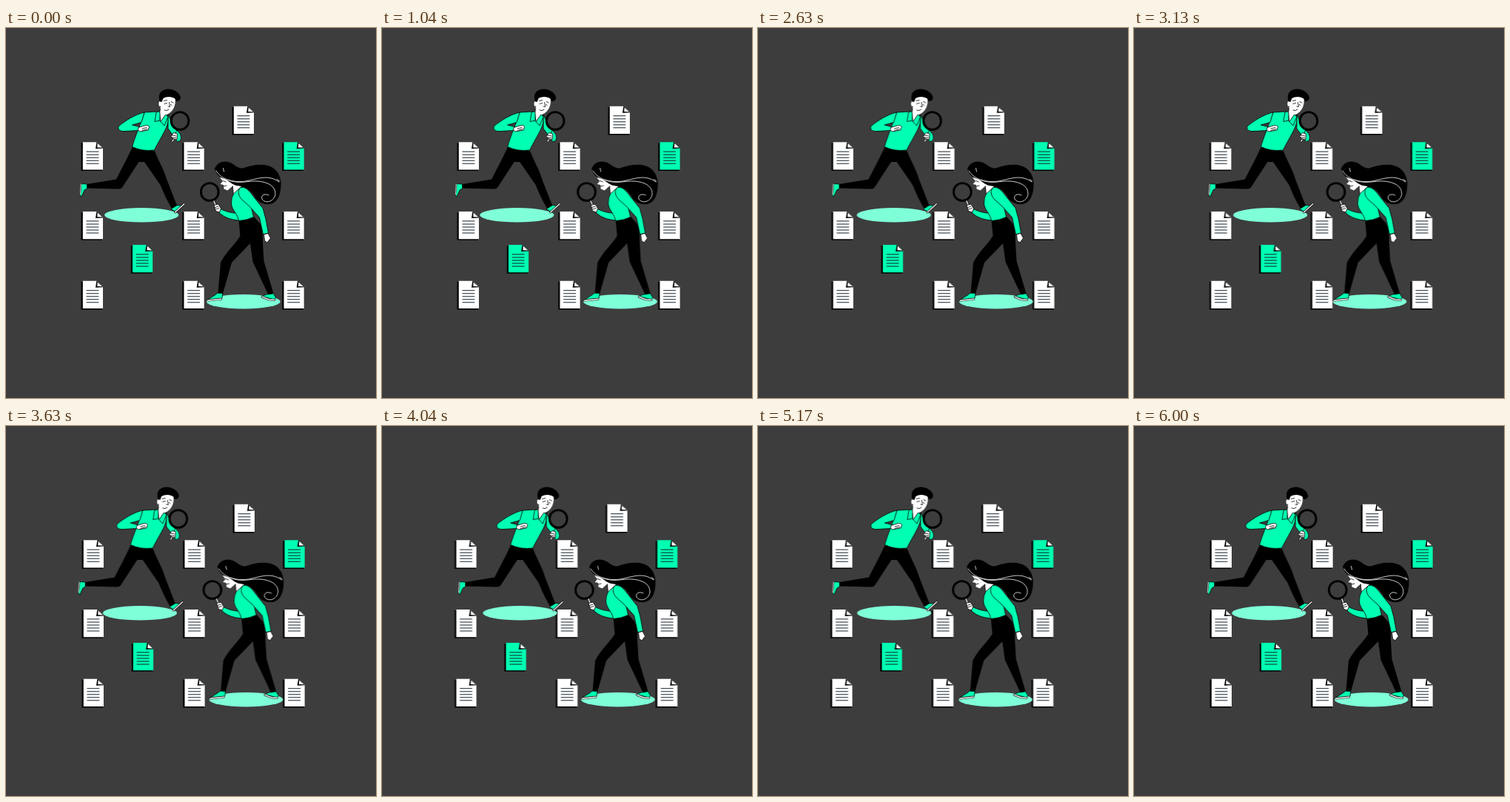
An HTML page for the animation above (6040 ms loop, 500 px wide and 500 px high).

```html
<!DOCTYPE html>
<html lang="en">
<head>
<meta charset="utf-8">
<title>Document search</title>
<style>
  html, body { margin: 0; width: 100%; height: 100%; overflow: hidden; background: #3d3d3d; }
  svg { display: block; width: 100%; height: 100%; }
  .g { fill: #00ffb2; }
  .w { fill: #fff; }
  .k { fill: #000; }
  .shade { fill: #7fffd8; }
  .o { stroke: #000; stroke-width: .8; stroke-linejoin: round; }
  .line { fill: none; stroke: #000; stroke-width: .8; stroke-linecap: round; }
  .strand { fill: none; stroke: #fff; stroke-width: .8; stroke-linecap: round; }
  .sole { fill: none; stroke: #000; stroke-width: 2.6; stroke-linecap: round; }
  .sole + .sole { stroke: #fff; stroke-width: 1.4; }
  .lens { fill: none; stroke: #000; stroke-width: 2.9; }

  /* One six-second shake per group, started 0, .5 and 1 s into the loop */
  #docs, #man, #woman { animation: 6040ms linear infinite; }
  #woman { animation-name: shake-woman; }
  #man { animation-name: shake-man; }
  #docs { animation-name: shake-docs; }

  @keyframes shake-woman {
    0%, 99.34%, 100% { transform: translateX(0); }
    9.93%, 89.4% { transform: translateX(-1px); }
    19.87%, 79.47% { transform: translateX(2px); }
    29.8%, 49.67%, 69.54% { transform: translateX(-4px); }
    39.74%, 59.6% { transform: translateX(4px); }
  }
  @keyframes shake-man {
    0%, 8.28% { transform: translateX(0); }
    18.21%, 97.68% { transform: translateX(-1px); }
    28.15%, 87.75% { transform: translateX(2px); }
    38.08%, 57.95%, 77.81% { transform: translateX(-4px); }
    48.01%, 67.88% { transform: translateX(4px); }
    100% { transform: translateX(-.77px); }
  }
  @keyframes shake-docs {
    0%, 16.56% { transform: translateX(0); }
    26.49% { transform: translateX(-1px); }
    36.42%, 96.03% { transform: translateX(2px); }
    46.36%, 66.23%, 86.09% { transform: translateX(-4px); }
    56.29%, 76.16% { transform: translateX(4px); }
    100% { transform: translateX(.8px); }
  }
</style>
</head>
<body>
<svg viewBox="0 0 500 500">
  <defs>
    <g id="doc">
      <path class="k" d="M-2.2 1H18V36H26.4V38.8H-2.2Z"/>
      <path d="M0 0H18.5L27.2 8.3V37.2H0Z"/>
      <path class="k" d="M18.6 0L17.2 9L27.4 8.4Z"/>
      <path class="w" d="M19.8 1.6L19.5 7.2L26.2 7.4Z"/>
      <path d="M4.7 12.9H21.6M4.7 17H21.6M4.7 21H21.6M4.7 25H21.6M4.7 29H21.6" stroke="#14202b"/>
    </g>
  </defs>

  <g id="docs">
    <g class="w">
      <use href="#doc" x="307.8" y="105.8"/>
      <use href="#doc" x="103.8" y="154.2"/>
      <use href="#doc" x="240.5" y="154.2"/>
      <use href="#doc" x="103.8" y="248"/>
      <use href="#doc" x="240.5" y="248"/>
      <use href="#doc" x="375.5" y="248"/>
      <use href="#doc" x="103.8" y="341.8"/>
      <use href="#doc" x="240.5" y="341.8"/>
      <use href="#doc" x="375.5" y="341.8"/>
    </g>
    <g class="g">
      <use href="#doc" x="375.5" y="154.2"/>
      <use href="#doc" x="171" y="293"/>
    </g>
  </g>

  <g id="man">
    <ellipse class="shade" cx="183.2" cy="252.8" rx="50" ry="9.7"/>
    <!-- shoes -->
    <path class="g o" d="M102 210.5L109.5 211V217L106 219L102 228L100.5 227Z"/>
    <path class="strand" d="M101.3 211L100.5 225" stroke-width="1.2"/>
    <path class="g o" d="M223 244.5L231 239.5L236 240L240 238L229 248.5Z"/>
    <path class="sole" d="M240.8 237.8L228.5 249"/>
    <path class="sole" d="M240.8 237.8L228.5 249"/>
    <!-- trousers -->
    <path class="k" d="M171 160.5L201 166C205 178 213 190 217 204L231 240L224 244C218 234 213 223 208.500 212L187 181H179.5L158 214Q156 217.5 152 217.5L109.5 216.500V211L149 204.5C154 194 162 180 171 160.5Z"/>
    <!-- far arm -->
    <path class="g o" d="M219 117C223 127 229 136 235.500 143.5C237.5 149 236.5 153 231.5 153.5L228 148L219 136Z"/>
    <!-- torso and near arm -->
    <path class="g o" d="M187 114L204 113L216 116C221 121 219 130 215 138C211 146 206 154 200.500 165Q184 167 170.5 160.5C174 148 181 132 187 114Z"/>
    <path class="g o" d="M187 114C174 117 162 125 153 132C150 136 153 139.5 159 139.6L179 138.5L180 133.5L170.5 131L183 127.5Z"/>
    <path class="w o" d="M179 134.5L187 132Q193 130.5 193.500 134L192 138L181 140L178.5 138Z"/>
    <path class="line" d="M184 136L190 134.5M184 138.5L191 136.5"/>
    <!-- head -->
    <path class="w o" d="M209 106L207.5 115L209 127L217 117Z"/>
    <path class="g o" d="M207.5 112.5L203 114L201 126.5L208 125L208 116Z"/>
    <path class="g o" d="M216 116.5L209 126.5L214 132L219 120Z"/>
    <path class="w" d="M211 94Q219 90 228.5 95C230 104 226 113 217.5 117C212 117.500 209 112 208.5 107.5Z"/>
    <ellipse class="w o" cx="207.8" cy="102.5" rx="2" ry="4"/>
    <path class="w" d="M209 98H214V110H209Z"/>
    <path class="k" d="M207.5 99C205 88 210 83.5 218 82.5C226 81.5 235 87 236 94C236 97 234 99 229.5 99L229 96C224 92 217 92.5 212.5 95L210.5 100Z"/>
    <path class="line" d="M213.5 98.500L217.5 97.500M223 99.500L226 101M214 102.500L217.500 101.500M222.500 103.500L224 104.500M220.5 100.5L221.500 106.500L219 106M214 111Q217 113 220 110"/>
    <!-- hand and magnifier -->
    <circle class="lens" cx="235" cy="125.5" r="11.9"/>
    <path class="line" d="M231 137L229 143" stroke-width="2"/>
    <path class="w o" d="M226.5 141.5L231.5 143L231 151L226 150L223 146.5Z"/>
    <path class="line" d="M224.5 145L230 146M224.5 148L230 148.7"/>
    <path class="sole" d="M226 151L225 153"/>
    <path class="sole" d="M226 151L225 153"/>
  </g>

  <g id="woman">
    <ellipse class="shade" cx="320.8" cy="369.7" rx="49.8" ry="9.7"/>
    <!-- shoes -->
    <path class="g o" d="M272.5 367L283 360.5L286 358H293L292 365Z"/>
    <path class="sole" d="M272.5 368.3L291 366.2"/>
    <path class="sole" d="M272.5 368.3L291 366.2"/>
    <path class="g o" d="M345.5 362.5L354 359.5L361 358.5L364.5 364L363 367Z"/>
    <path class="sole" d="M346 363.2L355 367L363 367.5"/>
    <path class="sole" d="M346 363.2L355 367L363 367.5"/>
    <!-- trousers -->
    <path class="k" d="M314.5 259L335 255L343 264Q347.500 271 347 290L348.5 315L361.5 359L354.500 360.5L333.5 316L330 291L305 317L293 359L286.5 358.5L290 317C297 303 309 293 316.500 281Z"/>
    <!-- face and neck -->
    <path class="w o" d="M306 210L319 213L317 218L307.5 226Z"/>
    <path class="w" d="M289 202L300 204L308 212L304.500 215L299.500 219.5L294.5 217.500L294 212L289.5 211L293 207Z"/>
    <path class="line" d="M293.5 206.5L297 208M294 214L298 213"/>
    <!-- hair -->
    <path class="k" d="M282 190C286 181 294 179 302 181.5C309 184 312 190 320 189.500C331 185 340 184 350 185C364 187 371 198 371.500 209C372 223 368 234 360 237C352 240 343 237 338 231C333 222 326 214 315 213.5C307 213 303 208 297 204.5C290 202 284 199 282 190Z"/>
    <path class="strand" d="M284 193C292 206 309 209 324 207C340 204 354 197 369 208M293.5 189.5L294.5 194M300 205C313 212 328 206 340 207C353 208 364 213 364 224C363 234 352 238 346.5 232C343 226 350 223 355 226M366 204.5L369.5 207"/>
    <!-- arms and torso -->
    <path class="g o" d="M290 244.5C297 248 304 250 314 250.5L314.5 260C305 259 296 257 288 249.5Z"/>
    <path class="g o" d="M307.5 224L318 214.5Q325 214.5 328 222L331 240L334.5 255.5Q325 260 314.5 260.5C313 251 305 246 304.500 237Q304.500 229 307.5 224Z"/>
    <path class="g o" d="M317 215.5C326 214 331 224 337 231L347 243.500L351 258L354.5 277L347.5 279L342.500 256L329 241L319 232C313 226 313 219 317 215.5Z"/>
    <path class="w o" d="M348.5 279L354 277.5L357.5 284L353 290L349.5 287.5Z"/>
    <!-- hand and magnifier -->
    <circle class="lens" cx="275.3" cy="221.5" r="11.9"/>
    <path class="sole" d="M281 234L283 239"/>
    <path class="sole" d="M281 234L283 239"/>
    <path class="w o" d="M281 239.5L287 238L290.5 244L288.5 249L283.5 247.5Z"/>
    <path class="line" d="M282.5 242.5L287 241M283.5 245L288 243.5"/>
  </g>
</svg>
</body>
</html>
```
